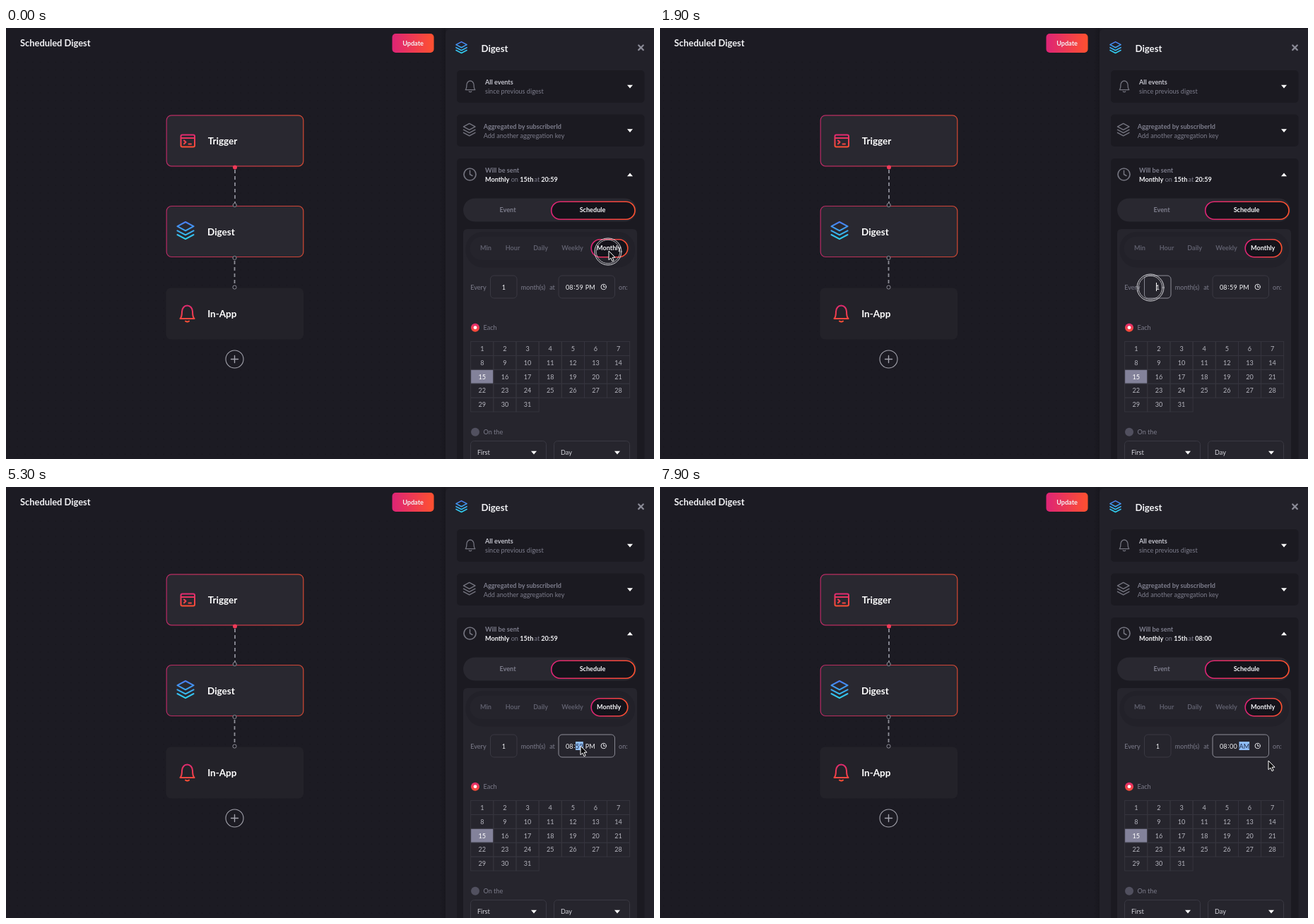
Write an HTML page that moves like this. It is 917 px wide and 611 px high and loops after 8000 ms.

```html
<!DOCTYPE html>
<html lang="en">
<head>
<meta charset="utf-8">
<title>Scheduled Digest</title>
<style>
html, body { margin: 0; width: 100%; height: 100%; overflow: hidden; background: #1c1b23; }
svg { display: block; }
text { font: 9.1px Lato, sans-serif; fill: #7d7d8c; }
.b { font-weight: 700; }
.w { fill: #f2f2f5; }
.mid { text-anchor: middle; }
.node { font-size: 13.5px; font-weight: 700; fill: #fff; }
.tab { font-weight: 700; text-anchor: middle; fill: #5f5f6d; }
.line { fill: none; stroke-linecap: round; stroke-linejoin: round; }
.field { fill: #26252d; stroke: #3a3943; }
.hot { fill: none; stroke: #85858f; }
.bad { fill: none; stroke: #a8324f; }
.sel { fill: #8fbdf8; }
.dark { fill: #1c2a44; }
#pointer { animation: move 8s infinite; }
@keyframes move {
  0% { transform: translate(853px, 316px); }
  3.75% { transform: translate(853px, 316px); animation-timing-function: steps(8, start); }
  13.75% { transform: translate(797px, 315px); }
  15% { transform: translate(797px, 315px); animation-timing-function: steps(3, start); }
  18.75% { transform: translate(758px, 372px); animation-timing-function: steps(1, start); }
  20% { transform: translate(732px, 403px); animation-timing-function: steps(1, start); }
  21.25% { transform: translate(706px, 390px); animation-timing-function: steps(1, start); }
  22.5% { transform: translate(695px, 367px); }
  50% { transform: translate(695px, 367px); animation-timing-function: step-end; }
  56.25% { transform: translate(706px, 368px); animation-timing-function: steps(3, start); }
  60% { transform: translate(821px, 368px); animation-timing-function: steps(1, start); }
  61.25% { transform: translate(809px, 367px); }
  65% { transform: translate(809px, 367px); animation-timing-function: steps(2, start); }
  67.5% { transform: translate(813px, 367px); }
  78.75% { transform: translate(813px, 367px); animation-timing-function: steps(2, start); }
  81.25%, 100% { transform: translate(861px, 388px); }
}
</style>
</head>
<body>
<svg width="917" height="611" viewBox="0 0 917 611">
  <defs>
    <linearGradient id="hot"><stop stop-color="#dd2476"/><stop offset="1" stop-color="#ff512f"/></linearGradient>
    <linearGradient id="edge"><stop stop-color="#b72a64"/><stop offset="1" stop-color="#d24833"/></linearGradient>
    <linearGradient id="warm" x2="0" y2="1"><stop stop-color="#e02a70"/><stop offset="1" stop-color="#ff4f35"/></linearGradient>
    <linearGradient id="cool" x2="0" y2="1"><stop stop-color="#4a7df2"/><stop offset="1" stop-color="#2fd3ee"/></linearGradient>
    <linearGradient id="shade"><stop stop-color="#15141a" stop-opacity="0"/><stop offset="1" stop-color="#15141a" stop-opacity=".6"/></linearGradient>
    <pattern id="dots" width="10.9" height="10.9" patternUnits="userSpaceOnUse"><circle cx="5" cy="5" r=".75" fill="#15141a"/></pattern>
    <path id="layers" d="M0-12 11.5-5.8 0 .4-11.5-5.8ZM-11.5 .3 0 6.4 11.5 .3M-11.5 6 0 12.2 11.5 6"/>
    <path id="bell" d="M-10 7.5C-7.5 5-7.5 2-7.5-2.5a7.5 8.5 0 0 1 15 0C7.5 2 7.5 5 10 7.5ZM-2.5 11Q0 13 2.5 11"/>
    <path id="down" d="M-4-2.3H4L0 2.5Z" fill="#fff"/>
  </defs>

  <rect width="917" height="611" fill="#1c1b23"/>
  <rect y="44" width="622" height="567" fill="url(#dots)"/>
  <text class="b w" x="20" y="26" style="font-size:12.9px">Scheduled Digest</text>
  <rect x="546.5" y="8" width="59" height="27" rx="5" fill="url(#hot)"/>
  <text class="b w mid" x="576" y="25">Update</text>

  <g stroke="#8e8e98" stroke-width="1.8" stroke-dasharray="5 4">
    <path d="M324 201V248M323.5 330V365"/>
  </g>
  <g stroke="url(#edge)" stroke-width="1.2" fill="#292830">
    <rect x="227.2" y="123.8" width="193.6" height="72" rx="7"/>
    <rect x="227.2" y="252.5" width="193.6" height="72" rx="7"/>
  </g>
  <rect x="226.5" y="368.5" width="194.5" height="73" rx="7" fill="#232229"/>
  <circle cx="324" cy="197.5" r="3" fill="#f03a58"/>
  <g fill="#1c1b23" stroke="#8e8e98">
    <circle cx="323.7" cy="251" r="2.6"/><circle cx="323.5" cy="326" r="2.6"/><circle cx="323.5" cy="367.5" r="2.6"/>
  </g>
  <g class="line" stroke-width="2">
    <g stroke="url(#warm)">
      <path d="M249.5 151.5H265a2 2 0 0 1 2 2V166.500a2 2 0 0 1-2 2H249.500a2 2 0 0 1-2-2V153.500a2 2 0 0 1 2-2ZM247.500 156H267M252 159.500 254.500 161.800 252 164.200M258.500 164.500H262"/>
      <use href="#bell" x="256.500" y="404.500"/>
    </g>
    <use href="#layers" x="254" y="287" stroke="url(#cool)"/>
  </g>
  <text class="node" x="285.700" y="165">Trigger</text>
  <text class="node" x="285" y="294">Digest</text>
  <text class="node" x="285.200" y="410">In-App</text>
  <g class="line" stroke="#a3a3ad">
    <circle cx="323.500" cy="469.500" r="12.500" stroke-width="1.100"/>
    <path d="M318.500 469.500H328.500M323.500 464.500V474.500" stroke-width="1.400"/>
  </g>

  <rect x="614" width="8" height="611" fill="url(#shade)"/>
  <path d="M622 611V8q0-6 6-6H917V611Z" fill="#222129"/>
  <g class="line" stroke="url(#cool)" stroke-width="2.400"><use href="#layers" transform="translate(644.500 27.500) scale(.66)"/></g>
  <text class="b w" x="672.500" y="33.500" style="font-size:13.200px">Digest</text>
  <path class="line" d="M895.200 24.500 901.800 31.100M901.800 24.500 895.200 31.100" stroke="#8b8b97" stroke-width="2.200"/>

  <g fill="#1b1a21">
    <rect x="638" y="60" width="265.500" height="46" rx="5"/>
    <rect x="638" y="122.500" width="265.500" height="45.500" rx="5"/>
    <rect x="638" y="185" width="265.500" height="440" rx="5"/>
  </g>
  <g class="line" stroke="#74747f">
    <use href="#bell" transform="translate(657 82.500) scale(.68)" stroke-width="1.900"/>
    <use href="#layers" transform="translate(655.700 144) scale(.72)" stroke-width="1.900"/>
    <path d="M656.500 202V207.500L660 209.500" stroke-width="1.500"/>
    <circle cx="656.500" cy="207.500" r="8.500" stroke-width="1.700"/>
  </g>
  <use href="#down" x="883" y="83"/>
  <use href="#down" x="883" y="145.500"/>
  <use href="#down" transform="translate(883 208) scale(1 -1)"/>
  <text class="b" x="678" y="79.800" style="fill:#c3c3cc">All events</text>
  <text x="678" y="93">since previous digest</text>
  <text class="b" x="675.700" y="142.500">Aggregated by subscriberId</text>
  <text x="675.700" y="155.500">Add another aggregation key</text>
  <text class="b" x="678" y="205.200">Will be sent</text>
  <text x="678" y="218"><tspan class="b w">Monthly</tspan> on <tspan class="b w">15th</tspan></text>
  <g data-on="0-5600 5800-6600 7600-8000"><text x="747.500" y="218">at</text></g>
  <text class="b w" x="757.300" y="218" data-on="0-5600">20:59</text>
  <text class="b w" x="757.300" y="218" data-on="5800-6600">20:00</text>
  <text class="b w" x="757.300" y="218" data-on="7600-8000">08:00</text>

  <rect x="647" y="241.500" width="245" height="33" rx="16.500" fill="#292830"/>
  <rect x="771.700" y="246.200" width="118.300" height="25" rx="12.500" fill="#14131a" stroke="url(#hot)" stroke-width="1.600"/>
  <text class="b mid" x="710" y="261.300">Event</text>
  <text class="b w mid" x="830" y="261.300">Schedule</text>

  <path d="M647 611V291q0-6 6-6H887q6 0 6 6V611Z" fill="#26252d"/>
  <rect x="650.500" y="289" width="239.500" height="50.500" rx="24" fill="#222129"/>
  <rect x="656.500" y="296" width="227" height="33" rx="16.500" fill="#25242c"/>
  <rect x="828.200" y="299.700" width="51.600" height="25" rx="12.500" fill="#14131a" stroke="url(#hot)" stroke-width="1.600"/>
  <text class="tab" x="679" y="315.300">Min</text>
  <text class="tab" x="717" y="315.300">Hour</text>
  <text class="tab" x="756.700" y="315.300">Daily</text>
  <text class="tab" x="801.500" y="315.300" data-on="0-700 1500-8000">Weekly</text>
  <text class="tab" x="801.500" y="315.300" data-on="700-1500" style="fill:#cfcfd6">Weekly</text>
  <text class="b w mid" x="853.200" y="315.300">Monthly</text>

  <text x="657.200" y="370.500">Every</text>
  <text class="mid" x="746" y="370.500">month(s)</text>
  <text class="mid" x="773" y="370.500">at</text>
  <text class="mid" x="873.300" y="370.500">on:</text>
  <rect class="field" x="685.500" y="351" width="37.500" height="32" rx="5"/>
  <rect class="hot" x="685.500" y="351" width="37.500" height="32" rx="5" data-on="1700-4800"/>
  <text class="w mid" x="704.300" y="370.700" data-on="0-3300 4300-8000">1</text>
  <g fill="#fff">
    <rect x="702" y="361" width="1" height="12" data-on="1700-2200"/>
    <rect x="707" y="361" width="1" height="12" data-on="2500-3000 4300-4800"/>
    <rect x="704" y="361" width="1" height="12" data-on="3500-4000"/>
  </g>

  <rect class="field" x="782" y="351" width="79.500" height="32" rx="5"/>
  <rect class="hot" x="782" y="351" width="79.500" height="32" rx="5" data-on="4800-5600 5800-6600 7600-8000"/>
  <rect class="bad" x="782" y="351" width="79.500" height="32" rx="5" data-on="5600-5800 6600-7600"/>
  <g class="line" stroke="#e6e6ea"><circle cx="845.700" cy="367" r="3.700"/><path d="M845.700 364.800V367.200H847.600"/></g>
  <g id="time"></g>

  <circle cx="664" cy="424.700" r="6" fill="url(#warm)"/>
  <circle cx="664" cy="424.700" r="2.400" fill="#fff"/>
  <text x="675.500" y="428">Each</text>
  <g id="days"></g>
  <circle cx="664" cy="572.700" r="6" fill="#51505f"/>
  <text x="675.500" y="576">On the</text>
  <g class="field">
    <rect x="657.500" y="585.500" width="107" height="34" rx="5"/>
    <rect x="775.500" y="585.500" width="107" height="34" rx="5"/>
  </g>
  <text x="667" y="605.300" style="fill:#d3d3da">First</text>
  <text x="785" y="605.300" style="fill:#d3d3da">Day</text>
  <use href="#down" x="747" y="602"/>
  <use href="#down" x="865" y="602"/>

  <g id="pointer">
    <g class="line" stroke="#dcdce0" data-on="0-100 1700-2000 4800-5000">
      <circle cx="-1" cy="1" r="19"/><circle cx="-1" cy="1" r="16.800" stroke-width=".8"/>
    </g>
    <path data-on="0-1700 4500-8000" d="M0 0V12.700L2.900 10 5 14.700 7.200 13.700 5.100 9.200H9Z" fill="#0c0c0e" stroke="#fff" stroke-linejoin="round"/>
  </g>
</svg>
<script>
const LOOP = 8000;
const $ = id => document.getElementById(id);
const text = (x, y, s, cls) => `<text class="${cls}" x="${x}" y="${y}">${s}</text>`;

// Time field: hour, minute and half-day, with one part highlighted.
function clock(on, min, half, picked, x = 792) {
  const parts = [[x, '08', 10.6], [x + 14, min, min === '--' ? 8 : 10.8], [x + 27.5, half, half === '--' ? 8 : 14.6]];
  const body = parts.map(([px, s, w], i) => {
    const mark = i === picked ? `<rect class="sel" x="${px}" y="361" width="${w}" height="12"/>` : '';
    return mark + text(px + w / 2, 370.7, s, i === picked ? 'dark mid' : 'w mid');
  }).join('');
  return `<g data-on="${on}">${body}${text(x + 12.4, 370.4, ':', 'w mid')}</g>`;
}
$('time').innerHTML =
  clock('0-4800', '59', 'PM') +
  clock('4800-5600', '59', 'PM', 1) +
  clock('5600-5800', '--', 'PM', 1) +
  clock('5800-5900', '00', 'PM', 1) +
  clock('5900-6600', '00', 'PM', 2) +
  clock('6600-7600', '00', '--', 2, 795.3) +
  clock('7600-8000', '00', 'AM', 2);

// Month grid, seven days to a row.
const W = 32.14, H = 19.9;
let days = '';
for (let d = 1; d <= 31; d++) {
  const x = 657.7 + (d - 1) % 7 * W, y = 444.5 + Math.floor((d - 1) / 7) * H;
  const on = d === 15;
  days += `<rect x="${x}" y="${y}" width="${W}" height="${H}" fill="${on ? '#83829a' : 'none'}" stroke="#37363f" stroke-width=".9"/>` +
    `<text class="mid" x="${x + W / 2}" y="${y + 13.2}" style="fill:${on ? '#fff' : '#b4b4bd'}">${d}</text>`;
}
$('days').innerHTML = days;

// Turn each data-on list of "from-to" times into a hard-cut opacity animation.
const pct = ms => ms / LOOP * 100 + '%';
let css = '';
document.querySelectorAll('[data-on]').forEach((el, i) => {
  const cuts = el.dataset.on.split(' ').map(span => {
    const [from, to] = span.split('-').map(Number);
    return `${pct(from)}{opacity:1}${to < LOOP ? pct(to) + '{opacity:0}' : '100%{opacity:1}'}`;
  });
  css += `@keyframes on${i}{0%,100%{opacity:0}${cuts.join('')}}`;
  el.style.animation = `on${i} ${LOOP}ms step-end infinite`;
});
document.head.appendChild(document.createElement('style')).textContent = css;
</script>
</body>
</html>
```
